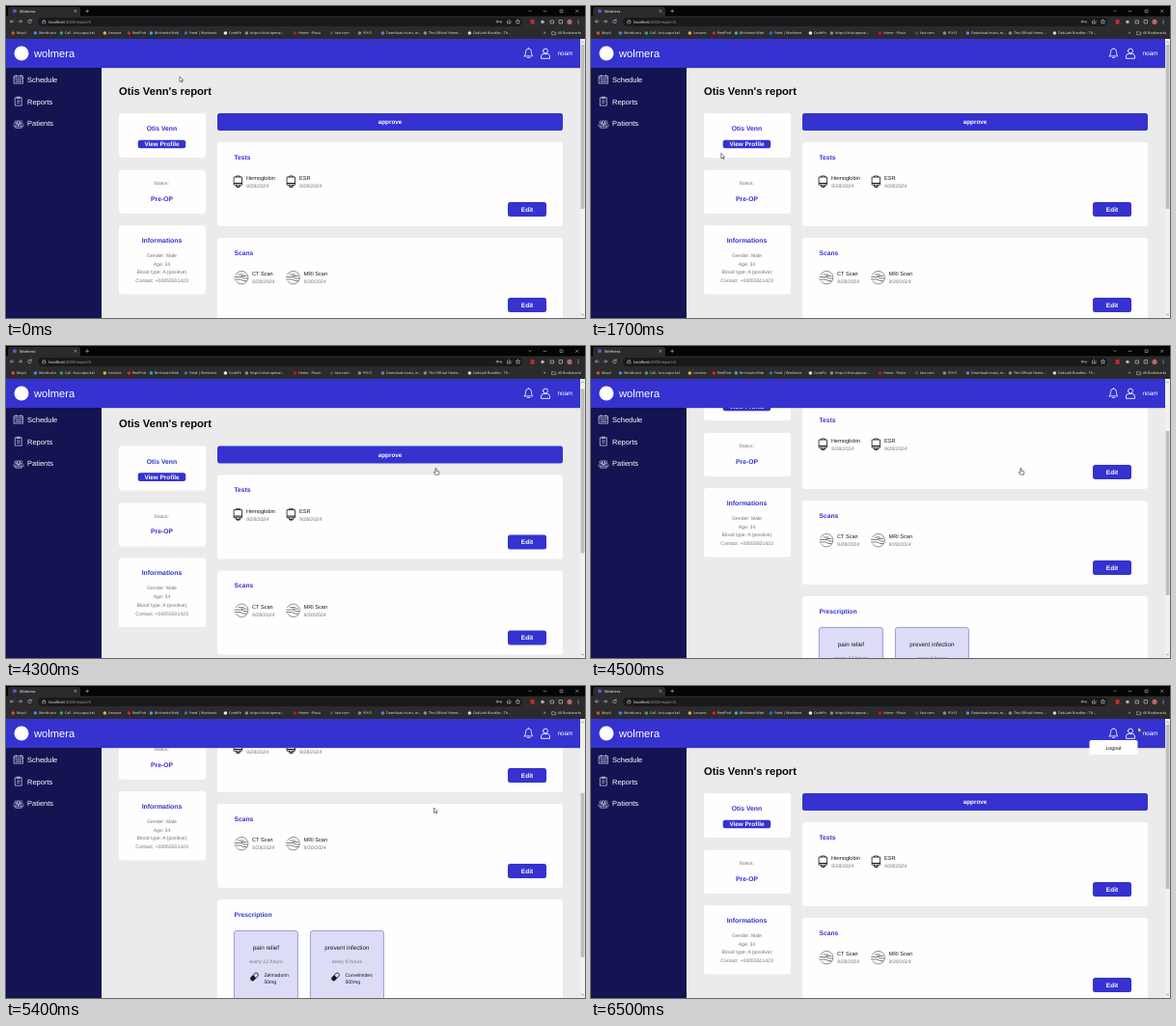
Animation of 600x323 px, one loop 6600 ms. Source, as an HTML page:

```html
<!DOCTYPE html>
<html lang="en">
<head>
<meta charset="utf-8">
<title>Wolmera</title>
<style>
html, body { margin: 0; width: 100%; height: 100%; overflow: hidden; background: #000; }
svg { display: block; width: 600px; height: 323px; font-family: "Liberation Sans", Arial, sans-serif; text-rendering: geometricPrecision; }
.chrome { font-family: "Open Sans", "Noto Sans", sans-serif; }
text { white-space: pre; }
</style>
</head>
<body>
<svg id="stage" viewBox="0 0 600 323"></svg>
<script>
const BLUE = '#3532d0', NAVY = '#141452', GREY = '#77777c', INK = '#17171c';
const LOOP = 6600, STEP = 100, MAX_SCROLL = 193;

const rect = (x, y, w, h, fill, r = 0, extra = '') =>
  `<rect x="${x}" y="${y}" width="${w}" height="${h}" rx="${r}" fill="${fill}" ${extra}/>`;
const dot = (x, y, r, fill) => `<circle cx="${x}" cy="${y}" r="${r}" fill="${fill}"/>`;
const line = (d, stroke, w = 0.7) =>
  `<path d="${d}" fill="none" stroke="${stroke}" stroke-width="${w}" stroke-linecap="round" stroke-linejoin="round"/>`;
const shift = (x, y) => `matrix(1 0 0 1 ${x} ${y})`;
const at = (x, y, body) => `<g transform="${shift(x, y)}">${body}</g>`;

// y is the visual middle of the line
const text = (s, x, y, size, fill, extra = '') =>
  `<text x="${x}" y="${y + size * 0.36}" font-size="${size}" fill="${fill}" ${extra}>${s}</text>`;
const MID = 'text-anchor="middle" ', BOLD = 'font-weight="700" ', ITALIC = 'font-style="italic" ';

const card = (x, y, w, h) => rect(x, y, w, h, '#fefefe', 3);
const button = (s, x, y, w, h, size) =>
  rect(x, y, w, h, BLUE, 2.5) + text(s, x + w / 2, y + h / 2, size, '#fff', MID + BOLD);

function bag(x, y) {
  return at(x, y, line('M-4 -5H4V3.2H-4ZM-2 3.2V5.2H2V3.2M-2 -5V-6H2V-5', INK, 0.8) +
    line('M-4 1.5H4', INK, 1) + rect(-1, 4.4, 2, 1.6, INK));
}

function scan(x, y) {
  return at(x, y, line('M-5.9 -3A6.8 6.8 0 1 1 -5.5 4', '#44444a', 0.6) +
    line('M-7 -.5H0L3 1H6M-7 2H-1L2 3.5H5M-3 -3H2M0 -1.5H5', '#44444a', 0.7));
}

function pill(x, y) {
  return at(x, y, `<g transform="rotate(-45)">${rect(-5, -2.4, 10, 4.8, INK, 2.4)}
    <path d="M.4 -1.7H2.6A1.7 1.7 0 0 1 2.6 1.7H.4Z" fill="#dcdcf7"/></g>`);
}

function item(icon, x, y, name, date, gap) {
  return icon(x, y) + text(name, x + gap, y - 3.6, 5.6, INK) +
    text(date, x + gap, y + 4.3, 5.2, GREY, ITALIC);
}

function panel(title, y, h, body) {
  return card(219, y, 358, h) + text(title, 236.5, y + 15.2, 6.7, BLUE, BOLD) + body +
    button('Edit', 520, y + h - 25, 40, 15, 6.5);
}

function dose(x, w, title, every, name, amount) {
  const mid = x + w / 2;
  return rect(x, 371.4, w, 74, '#dcdcf7', 2.5, 'stroke="#8583de" stroke-width=".8"') +
    text(title, mid, 389, 6.3, INK, MID) + text(every, mid, 403.5, 5.2, GREY, MID + ITALIC) +
    pill(mid - 12, 419) + text(name, mid - 2, 417, 5.1, INK) + text(amount, mid - 2, 424.5, 5.1, INK);
}

function page() {
  const facts = ['Gender: Male', 'Age: 34', 'Blood type: A (positive)', 'Contact: +00055501423'];
  return text("Otis Venn's report", 117, 87.6, 11.2, '#08080c', BOLD) +
    card(117, 111, 90, 46) + text('Otis Venn', 161.5, 126.5, 6.8, BLUE, MID + BOLD) +
    button('View Profile', 136.7, 138.7, 49.5, 8.6, 6.4) +
    card(117, 170, 90, 45) + text('Status:', 161, 183.5, 5, GREY, MID) +
    text('Pre-OP', 161.5, 199.2, 6.8, BLUE, MID + BOLD) +
    card(117, 227, 90, 71.5) + text('Informations', 161.5, 242.3, 6.9, BLUE, MID + BOLD) +
    facts.map((s, i) => text(s, 161.5, 258 + i * 8.8, 5.1, GREY, MID)).join('') +
    button('approve', 219, 111, 358, 18, 6.3) +
    panel('Tests', 141, 87,
      item(bag, 240.5, 182, 'Hemoglobin', '9/28/2024', 8.5) +
      item(bag, 295.5, 182, 'ESR', '9/28/2024', 8.5)) +
    panel('Scans', 240, 87,
      item(scan, 244, 281, 'CT Scan', '9/28/2024', 11) +
      item(scan, 297.5, 281, 'MRI Scan', '9/30/2024', 11)) +
    panel('Prescription', 339, 145,
      dose(236.4, 66, 'pain relief', 'every 12 hours', 'Zelmadorin', '50mg') +
      dose(315.4, 76, 'prevent infection', 'every 6 hours', 'Corvelmides', '500mg'));
}

function person(x, y, s, color) {
  return at(x, y, `<g transform="scale(${s})">` +
    line('M-2.6 -2.6A2.6 2.6 0 1 0 2.6 -2.6A2.6 2.6 0 1 0 -2.6 -2.6ZM-4.7 5.2V3Q-4.5 .6 -2 .6H2Q4.5 .6 4.7 3V5.2Z', color, 0.9) + '</g>');
}

function sidebar() {
  const pale = '#d8d8f0';
  const rows = ['Schedule', 'Reports', 'Patients'];
  return rect(0, 64, 99, 259, NAVY) +
    rows.map((s, i) => text(s, 22, 76.3 + i * 22.5, 7.5, '#fff')).join('') +
    at(13, 76, line('M-4.5 -3.5H4.5V4.2H-4.5ZM-4.5 -1.4H4.5M-2.5 -4.5V-3M2.5 -4.5V-3M-3 .6H3M-3 2.4H3', pale, 0.7)) +
    at(13, 98.7, line('M-3.3 -3.8H3.3V4.4H-3.3ZM-1.3 -4.6H1.3V-3H-1.3ZM-1.5 -.5H1.5M-1.5 1.5H1', pale, 0.7)) +
    person(10.5, 121.5, 0.55, pale) + person(15.5, 121.5, 0.55, pale) + person(13, 122.3, 0.68, pale);
}

function header() {
  return rect(0, 64, 595, 1, '#000', 0, 'opacity=".12"') + rect(0, 34, 595, 30, BLUE) +
    dot(16, 49, 7.5, '#fff') + text('wolmera', 29, 48.6, 11.2, '#fff') +
    at(541.5, 48.5, line('M-4.2 3.4H4.2Q3 2.2 3 -.8Q3 -4.2 0 -4.4Q-3 -4.2 -3 -.8Q-3 2.2 -4.2 3.4ZM-1.2 4.9H1.2M0 -4.5V-5', '#fff', 0.8)) +
    person(559, 49, 0.95, '#fff') + text('noam', 571.4, 49, 6.4, '#fff');
}

function browser() {
  const pale = '#d6d6d8';
  const marks = [
    [11, 'Mopil', '#d94a3d'], [34, 'Wordturns', '#4a86e8'], [61, 'Call - bru-vapo-kel', '#35a56b'],
    [106, 'Lessons', '#e0b23c'], [131, 'ReelPod', '#e02020'], [154, 'Birchnote Web', '#36a5de'],
    [190, 'Feed | Worknest', '#2b74b8'], [231, 'CodeFir', '#eeeeee'], [253, 'https://chat.openai...', '#8c8c90'],
    [303, 'Home - Plovix', '#c3161c'], [341, 'fast.com', '#4b4b50'], [370, 'PIX·O', '#8c8c90'],
    [394, 'Download music, m...', '#5b82c9'], [438, 'The Official Home...', '#8c8c90'],
    [484, 'OakLark Bundles - Th...', '#d7d7d7']];
  const tools = line(
    'M8 16H4.5M6 14.5L4.5 16L6 17.5M13 16H16.5M15 14.5L16.5 16L15 17.5' +
    'M26 15A1.8 1.8 0 1 0 26.2 16.8M26.2 14V15.2H25M519.5 15.5V18H523V15.5M521.2 17V14' +
    'M530.5 14L531.2 15.5L532.8 15.7L531.6 16.8L532 18.3L530.5 17.5L529 18.3L529.4 16.8L528.2 15.7L529.8 15.5Z' +
    'M510 16.2H513.5M513 16.2V17.4', pale, 0.55);
  return '<g class="chrome">' + rect(0, 0, 600, 11, '#050505') +
    rect(2, 1, 75, 11, '#2b2b2d', 2.5) + rect(0, 10.5, 600, 23.5, '#2b2b2d') +
    dot(9, 5.3, 2, '#5a57dd') + text('Wolmera', 14, 5.2, 3.9, '#fff') +
    line('M70.8 4.2L73 6.4M73 4.2L70.8 6.4M82.7 5.3H85.7M84.2 3.8V6.8', pale, 0.5) +
    line('M541.8 4.6L543 5.8L544.2 4.6M557 5.3H560M574.5 4H577V6.5H574.5ZM590.5 4L593 6.5M593 4L590.5 6.5', pale, 0.5) +
    rect(33, 12, 502, 9, '#19191b', 4.5) + tools +
    line('M38 15.8H41V18H38ZM38.6 15.8V14.8Q39.5 13.6 40.4 14.8V15.8', pale, 0.45) +
    text('localhost<tspan fill="#a4a4a8">:3000/report/6</tspan>', 44.2, 16.4, 4, '#fff') +
    `<circle cx="509" cy="16.2" r="1" fill="none" stroke="${pale}" stroke-width=".5"/>` +
    rect(543.6, 14, 4, 5, '#c52828', 0.8) + dot(556, 16.4, 1.7, '#b9b9bd') +
    line('M564.5 15H567.5V18H564.5ZM573.5 14.6H576.5V18H573.5Z', pale, 0.6) + dot(584, 16.4, 2.6, '#b46a63') +
    [14.7, 16.4, 18.1].map(y => dot(593, y, 0.5, pale)).join('') +
    marks.map(([x, s, c]) => dot(x - 3.6, 28, 1.8, c) + text(s, x, 28, 3.65, '#e9e9eb')).join('') +
    text('»', 557, 27.6, 5, pale) + line('M566 26.7H567.5L568 27.2H569.8V29.7H566Z', pale, 0.5) +
    text('All Bookmarks', 572, 28, 3.65, '#e9e9eb') + '</g>';
}

const ARROW = '<path d="M0 0V5.4L1.3 4.3L2.1 6.1L3 5.7L2.2 4H3.9Z" fill="#fff" stroke="#111" stroke-width=".5"/>';
const HAND = '<path d="M-.6 -.4Q0 -1.1 .6 -.4V2L3 2.5Q3.5 2.7 3.4 3.5L2.8 6H-.6L-2.2 3.6Q-2 2.7 -.6 3.6Z" fill="#fff" stroke="#111" stroke-width=".55"/>';

document.getElementById('stage').innerHTML =
  rect(0, 34, 600, 289, '#ecebeb') + `<g id="page">${page()}</g>` + sidebar() + header() +
  rect(595, 34, 5, 289, '#f1f1f1') +
  line('M596.5 38L597.5 36.8L598.5 38M596.5 319L597.5 320.2L598.5 319', '#777', 0.7) +
  rect(595.6, 40, 3.8, 170, '#bdbdc0', 0, 'id="thumb"') + browser() +
  `<g id="menu">${rect(516.5, 56, 50, 15, '#fefefe', 2)}${text('Logout', 541.5, 63.6, 5.3, INK, MID)}</g>` +
  `<g id="arrow">${ARROW}</g><g id="hand">${HAND}</g>`;

const [pageEl, thumb, menu, arrow, hand] =
  ['page', 'thumb', 'menu', 'arrow', 'hand'].map(id => document.getElementById(id));

const smooth = k => k * k * (3 - 2 * k);

// keys: rows of [time, ...values]
function track(keys, t, ease = k => k) {
  const i = keys.findIndex(k => k[0] > t);
  if (i === 0) return keys[0].slice(1);
  if (i < 0) return keys[keys.length - 1].slice(1);
  const a = keys[i - 1], b = keys[i];
  const k = ease((t - a[0]) / (b[0] - a[0]));
  return a.slice(1).map((v, n) => v + (b[n + 1] - v) * k);
}

const POINTER = [[200, 180, 73], [1200, 134.8, 152.5], [3400, 134.8, 152.5], [4100, 445.5, 127.2],
  [4800, 445.5, 127.2], [5200, 443.5, 126], [5600, 443.5, 126], [6300, 567, 42.5]];
const SCROLL = [[4200, 0], [4300, 7.4], [4500, 80], [4700, 150], [4800, 180], [4900, MAX_SCROLL],
  [5300, MAX_SCROLL], [5400, 118], [5500, 40], [5600, 0]];

const show = (el, on) => el.setAttribute('visibility', on ? 'visible' : 'hidden');

function draw(t) {
  const [scroll] = track(SCROLL, t), [x, y] = track(POINTER, t, smooth);
  const overApprove = t >= 3800 && t < 4800 && x > 219;
  pageEl.setAttribute('transform', shift(0, -scroll));
  thumb.setAttribute('y', 40 + scroll * 0.6);
  show(menu, t >= 6200);
  show(arrow, !overApprove);
  show(hand, overApprove);
  for (const el of [arrow, hand]) el.setAttribute('transform', shift(x, y));
}

const start = performance.now();
function tick() {
  const t = Math.max(0, performance.now() - start) % LOOP;
  draw(Math.floor(t / STEP) * STEP);
  requestAnimationFrame(tick);
}
draw(0);
requestAnimationFrame(tick);
</script>
</body>
</html>
```
